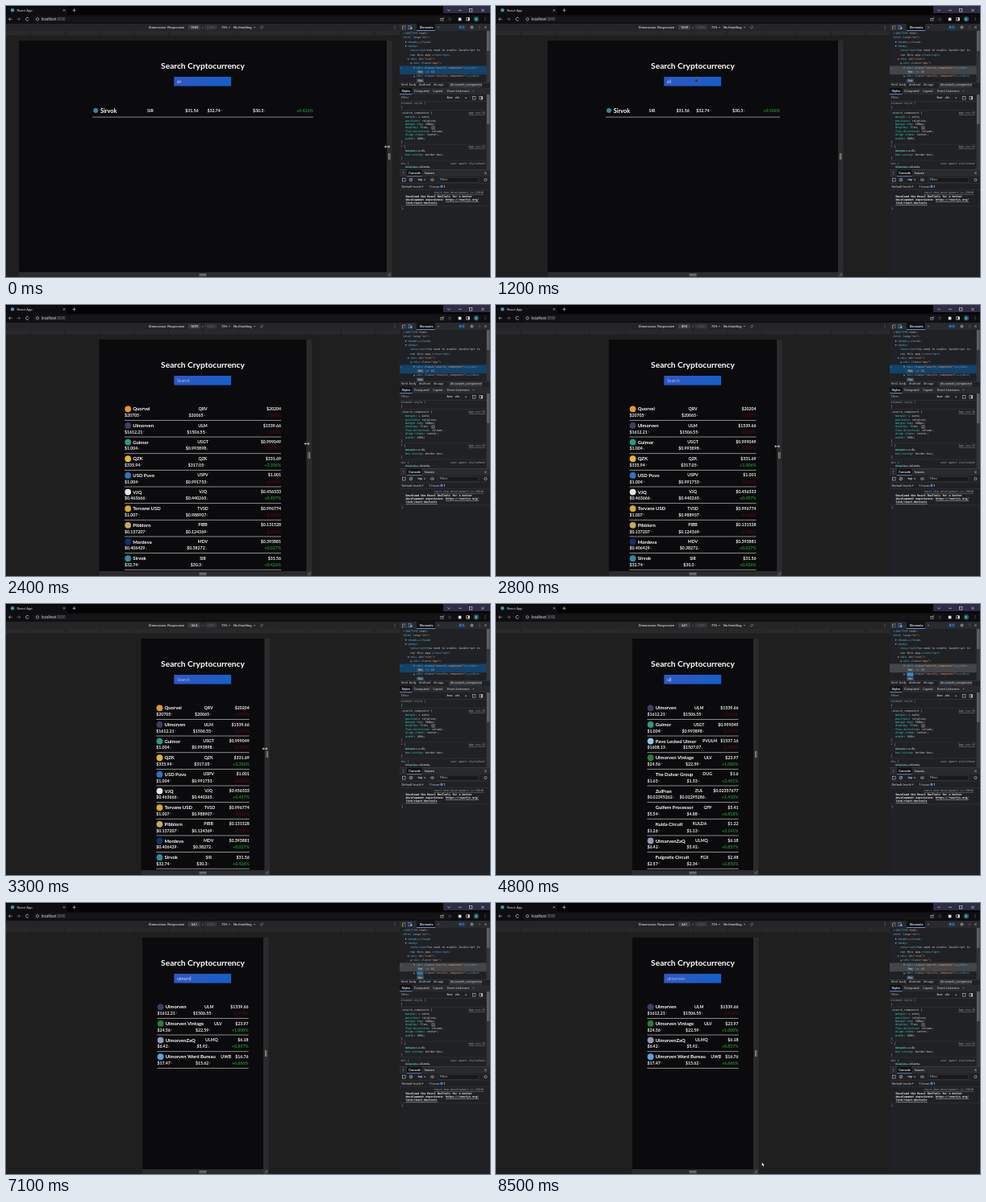
Write an HTML page with a canvas that moves like this. It is 600 px wide and 337 px high and loops after 8.6 s.

```html
<!DOCTYPE html>
<html lang="en">
<head>
<meta charset="utf-8">
<title>Search Cryptocurrency</title>
<style>
html, body { margin: 0; width: 100%; height: 100%; overflow: hidden; background: #1f1f20; }
canvas { display: block; width: 600px; height: 337px; }
</style>
</head>
<body>
<canvas id="stage"></canvas>
<script>
const LOOP = 8600, STEP = 100, CENTER = 244, PAGE_TOP = 43, PAGE_BOTTOM = 331;
const SANS = 'Lato, "Open Sans", sans-serif';
const UI = 'Roboto, sans-serif';
const MONO = '"DejaVu Sans Mono", monospace';
const canvas = document.getElementById('stage');
const ctx = canvas.getContext('2d');
const ratio = window.devicePixelRatio || 1;
canvas.width = 600 * ratio;
canvas.height = 337 * ratio;

// name | symbol | price | high | low | change | icon colour
const coins = `
Quorvel|QRV|20204|20705|20065|-1.093|#e8962e
Ulmorven|ULM|1539.66|1612.21|1506.55|-2.018|#3c3f62
Gulmor|USGT|0.999049|1.004|0.993898|-0.109|#2a9b7c
QZK|QZK|331.69|335.94|317.05|+3.306|#e9b233
USD Puvo|USPV|1.001|1.004|0.991753|-0.020|#2c74c6
VJQ|VJQ|0.456333|0.463666|0.440265|+0.457|#e4e4e4
Torvane USD|TVSD|0.996774|1.007|0.988907|-0.160|#d9a92c
Pibblorn|PIBB|0.131528|0.137207|0.124369|-2.355|#c9a860
Mordeva|MDV|0.393881|0.406429|0.38272|+0.027|#14306a
Sirvok|SIR|31.56|32.74|30.3|+0.426|#2f8aa0
Tarnobix|TNB|0.879112|0.91204|0.86107|-1.420|#7a4fd0
Hexlume|HXL|6.52|6.71|6.33|+0.912|#d0488a
Pavo Locked Ulmor|PVULM|1537.16|1608.13|1507.07|-2.104|#8cc8e8
Ulmorven Vintage|ULV|23.97|24.56|22.59|+1.000|#2b7a3c
The Dulvar Group|DUG|1.6|1.65|1.53|+2.401|
ZulPran|ZUL|0.02357677|0.02395262|0.02295286|+1.410|
Gulfern Processor|GFP|5.41|5.54|4.88|+6.818|
Kulda Circuit|KULDA|1.22|1.26|1.13|+2.141|
UlmorvenZaQ|ULMQ|6.18|6.42|5.92|+0.857|#9298b8
Fulgratix Circuit|FGX|2.48|2.57|2.34|+2.850|
Ulmorven Word Bureau|UWB|16.76|17.47|15.62|+6.666|#5aa0e6
`.trim().split('\n').map(line => {
  const [name, symbol, price, high, low, change, color] = line.split('|');
  return { name, symbol, price, high, low, change, color };
});

const widths = [[0, 456], [700, 360], [2000, 360], [2400, 257], [2900, 196], [3300, 153], [3500, 150]];
const queries = [
  [0, 'sir'], [1200, 'si'], [1300, 's'], [1400, ''], [4800, 'ul'], [5000, 'ulm'], [5100, 'ulmo'],
  [5300, 'ulmor'], [5500, 'ulmorz'], [5700, 'ulmorze'], [5900, 'ulmorzen'], [6400, 'ulmorz'],
  [6600, 'ulmor'], [6900, 'ulmorv'], [7200, 'ulmorve'], [7500, 'ulmorven']
];
const listChanges = [1300, 1400, 4800, 5000, 5300, 5500, 6600, 6900];

function track(keys, t) {
  const i = keys.findIndex(k => k[0] > t);
  if (i < 0) return keys[keys.length - 1][1];
  if (i === 0) return keys[0][1];
  const [t0, a] = keys[i - 1], [t1, b] = keys[i];
  return a + (b - a) * (t - t0) / (t1 - t0);
}
const held = (keys, t) => keys.filter(k => k[0] <= t).pop()[1];

function rect(x, y, w, h, color) {
  ctx.fillStyle = color;
  ctx.fillRect(x, y, w, h);
}
function round(x, y, w, h, r, color) {
  ctx.fillStyle = color;
  ctx.beginPath();
  ctx.roundRect(x, y, w, h, r);
  ctx.fill();
}
function disc(x, y, r, color) {
  ctx.fillStyle = color;
  ctx.beginPath();
  ctx.arc(x, y, r, 0, Math.PI * 2);
  ctx.fill();
}
function line(points, color, width = 0.6) {
  ctx.strokeStyle = color;
  ctx.lineWidth = width;
  ctx.beginPath();
  points.forEach(([x, y], i) => i ? ctx.lineTo(x, y) : ctx.moveTo(x, y));
  ctx.stroke();
}
function ring(x, y, r, color, from = 0, to = Math.PI * 2) {
  ctx.strokeStyle = color;
  ctx.lineWidth = 0.7;
  ctx.beginPath();
  ctx.arc(x, y, r, from, to);
  ctx.stroke();
}
function frame(x, y, w, h, color) {
  ctx.strokeStyle = color;
  ctx.lineWidth = 0.6;
  ctx.strokeRect(x, y, w, h);
}
function text(s, x, y, size, color, font = UI, align = 'left', weight = 400) {
  ctx.font = `${weight} ${size}px ${font}`;
  ctx.textAlign = align;
  ctx.textBaseline = 'middle';
  ctx.fillStyle = color;
  ctx.fillText(s, x, y);
  return ctx.measureText(s).width;
}
const ui = (s, x, y, color = '#d2d4d7') => text(s, x, y, 4, color, UI, 'left', 500);
const mono = (s, x, y, color = '#c4c7ca', weight = 400) => text(s, x, y, 3.43, color, MONO, 'left', weight);
function triangle(x, y, color = '#9aa0a6', down = true) {
  ctx.fillStyle = color;
  ctx.beginPath();
  if (down) { ctx.moveTo(x - 1.2, y - 0.7); ctx.lineTo(x + 1.2, y - 0.7); ctx.lineTo(x, y + 1); }
  else { ctx.moveTo(x - 0.7, y - 1.2); ctx.lineTo(x - 0.7, y + 1.2); ctx.lineTo(x + 1, y); }
  ctx.fill();
}
function cross(x, y, r, color) {
  line([[x - r, y - r], [x + r, y + r]], color);
  line([[x + r, y - r], [x - r, y + r]], color);
}
function dots(x, y, color = '#b8bbbe') {
  for (const d of [-1.6, 0, 1.6]) disc(x, y + d, 0.45, color);
}
function scrollbar(y, height, thumb) {
  rect(595.5, y, 4.5, height, '#343538');
  rect(596, y, 3.5, thumb, '#5c5e61');
}

function drawBrowser() {
  rect(0, 0, 600, 11, '#040405');
  round(1, 1, 75, 11, [3, 3, 0, 0], '#0e0e10');
  disc(8, 5.3, 2.2, '#3d95ab');
  text('React App', 13.5, 5.5, 4.2, '#d8dadd');
  cross(72, 5.3, 1.2, '#c8cacc');
  line([[82.5, 5.3], [86.5, 5.3]], '#e4e5e7');
  line([[84.5, 3.3], [84.5, 7.3]], '#e4e5e7');
  rect(542, 0, 58, 9, '#2e2c47');
  line([[547.2, 4.5], [549, 6.2], [550.8, 4.5]], '#d8dadd');
  line([[561, 5.3], [565, 5.3]], '#d8dadd');
  frame(574.5, 3.6, 3.4, 3.4, '#d8dadd');
  cross(591, 5.3, 1.7, '#d8dadd');

  rect(0, 11, 600, 11, '#0e0e10');
  for (const [x, dir, c] of [[5.5, -1, '#d0d2d5'], [15.5, 1, '#85888c']]) {
    line([[x - 2, 16.3], [x + 2, 16.3]], c);
    line([[x + dir * 0.3, 14.4], [x + dir * 2, 16.3], [x + dir * 0.3, 18.2]], c);
  }
  ring(26.5, 16.3, 2, '#d0d2d5', 0.5, 5.8);
  round(33, 12.4, 521, 8, 4, '#151517');
  ring(39, 16.3, 1.6, '#b8bbbe');
  const w = text('localhost', 44, 16.5, 4.5, '#e0e2e4');
  text(':3000', 44 + w, 16.5, 4.5, '#85888c');
  frame(538.8, 15.3, 3.2, 2.8, '#b8bbbe');
  line([[540.5, 16.5], [543, 13.8]], '#b8bbbe');
  text('☆', 550, 16.3, 5, '#b8bbbe', '"DejaVu Sans", sans-serif', 'center');
  rect(560.8, 14.7, 3.6, 3.6, '#e4e5e7');
  frame(570.8, 14.7, 3.8, 3.4, '#e4e5e7');
  rect(572.7, 14.7, 1.9, 3.4, '#e4e5e7');
  disc(583, 16.3, 3.2, '#176068');
  text('E', 583, 16.5, 4, '#fff', UI, 'center');
  dots(594, 16.3);
}

function drawDeviceBar(width) {
  rect(0, 22, 488, 9, '#252527');
  ui('Dimensions: Responsive', 177, 26.6);
  triangle(220, 26.6);
  round(226, 23.6, 15, 6, 0.8, '#3b3c3f');
  text(String(Math.round(width * 4.275)), 233.5, 26.7, 4, '#e0e2e4', UI, 'center', 500);
  ui('×', 242.7, 26.6, '#8b8e92');
  round(246.5, 23.6, 15, 6, 0.8, '#333437');
  text('1230', 254, 26.7, 4, '#606367', UI, 'center');
  ui('73%', 267, 26.6);
  triangle(277, 26.6);
  ui('No throttling', 282, 26.6);
  triangle(308, 26.6);
  ctx.save();
  ctx.translate(317, 26.6);
  ctx.rotate(Math.PI / 4);
  frame(-1, -1.6, 2, 3.2, '#8b8e92');
  ctx.restore();
  dots(482, 26.6);
  rect(0, 31, 488, 306, '#1f1f20');
  rect(0, 31, 488, 5.5, '#29292b');
  for (let x = CENTER - 5 * 42.75; x < 488; x += 42.75) rect(x, 31, 0.6, 5.5, '#1c1c1d');
}

const changeColor = coin => coin.change[0] === '+' ? '#22902c' : '#520916';
const value = (s, x, y, align, color = '#f2f2f2') => text(s, x, y, 5.2, color, SANS, align, 700);
function drawPrice(amount, arrow, x, y, centered = false) {
  ctx.font = `700 5.2px ${SANS}`;
  const w = ctx.measureText('$' + amount).width;
  const left = centered ? x - w / 2 - 1 : x;
  value('$' + amount, left, y, 'left');
  text(arrow, left + w + 0.2, y, 3, '#b0b0b0', '"DejaVu Sans", sans-serif');
}

function drawWideRow(coin, x, w, y) {
  if (coin.color) disc(x + 4, y, 3, coin.color);
  text(coin.name, x + 9.8, y + 0.3, 7.3, '#fff', SANS, 'left', 700);
  value(coin.symbol, x + w * 0.248, y + 0.3, 'left');
  value('$' + coin.price, x + w * 0.48, y + 0.3, 'right');
  drawPrice(coin.high, '↑', x + w * 0.52, y + 0.3);
  drawPrice(coin.low, '↓', x + w * 0.727, y + 0.3);
  value(coin.change + '%', x + w, y + 0.3, 'right', changeColor(coin));
  rect(x, y + 7.7, w, 0.8, '#a9a9a9');
}

function drawNarrowRow(coin, x, w, y) {
  if (coin.color) disc(x + 4.2, y, 3.9, coin.color);
  const nameWidth = text(coin.name, x + 10.3, y + 0.3, 5.9, '#fff', SANS, 'left', 700);
  const first = Math.max(w / 3, 48, Math.min(nameWidth + 15.3, 76));
  value(coin.symbol, x + first + (w - first) / 4, y, 'center');
  value('$' + coin.price, x + w, y, 'right');
  drawPrice(coin.high, '↑', x, y + 8.3);
  drawPrice(coin.low, '↓', x + 57.5 + (w - 115) * 0.405, y + 8.3, true);
  value(coin.change + '%', x + w, y + 8.3, 'right', changeColor(coin));
  rect(x, y + 13.7, w, 0.8, '#a9a9a9');
}

function drawInput(t, query, focused) {
  const fill = ctx.createLinearGradient(208.5, 88, 279.5, 99);
  fill.addColorStop(0, '#2f57c4');
  fill.addColorStop(1, '#145fcb');
  rect(208.3, 88, 70.8, 11.6, fill);
  const color = query && t < 7800 ? '#d5e1fa' : '#a4bdf0';
  const w = text(query || 'Search', 212, 94, 5.3, color, SANS);
  const blink = (t >= 3800 && t < 4000) || (t >= 4200 && t < 4500);
  const typing = t >= 4800 && t < 6100 || t >= 6400 && t < 7800;
  if (focused && (blink || typing || t < 2000)) rect(212.4 + (query ? w : 0), 91.3, 0.5, 5.2, '#e8eefc');
}

function drawPage(t, width, focused) {
  const left = CENTER - width / 2, right = CENTER + width / 2;
  rect(left, PAGE_TOP, width, PAGE_BOTTOM - PAGE_TOP, '#0b0b0d');
  rect(right, PAGE_TOP, 6.5, PAGE_BOTTOM - PAGE_TOP, '#2b2b2d');
  rect(left, PAGE_BOTTOM, width, 6, '#2b2b2d');
  rect(right, PAGE_BOTTOM, 6.5, 6, '#343436');
  for (const d of [0, 1.6]) {
    rect(right + 2 + d, 183, 0.8, 8, '#a4a4a4');
    rect(CENTER - 4.5, 333.2 + d, 9, 0.8, '#a4a4a4');
  }
  line([[right + 1.5, 335.5], [right + 5, 332.2]], '#999');
  line([[right + 3.3, 335.7], [right + 5, 334]], '#999');

  text('Search Cryptocurrency', CENTER, 75, 10.2, '#fff', SANS, 'center', 700);
  const query = held(queries, t);
  drawInput(t, query, focused);

  const found = coins.filter(c => c.name.toLowerCase().includes(query) || c.symbol.toLowerCase().includes(query));
  if (!found.length) {
    text('No results', CENTER - 0.8, 129, 7.5, '#fff', SANS, 'center', 700);
    return;
  }
  ctx.save();
  ctx.beginPath();
  ctx.rect(left, PAGE_TOP, width, PAGE_BOTTOM - PAGE_TOP);
  ctx.clip();
  const wide = width > 285;
  const w = width * (wide ? 0.6 : 0.755);
  found.forEach((coin, i) => {
    if (wide) drawWideRow(coin, CENTER - w / 2, w, 130 + i * 15.5);
    else drawNarrowRow(coin, CENTER - w / 2, w, 129.3 + i * 20.65);
  });
  ctx.restore();
}

function markup(s, x, y) {
  for (const part of s.split(/("[^"]*"|\b(?:class|id|lang)(?==)|<[^\s>]*|>)/)) {
    const color = part[0] === '"' ? '#f29766' : /^[<>]/.test(part) ? '#5db0d7' :
      /^(class|id|lang)$/.test(part) ? '#9bbbdc' : '#c8cbcf';
    x += mono(part, x, y, color);
  }
}
function badge(x, y) {
  round(x, y - 2.2, 9, 4.4, 1.5, '#40505f');
  text('flex', x + 4.5, y, 3.3, '#d5dbe2', UI, 'center');
}

function drawElements(t, focused) {
  rect(488, 22, 112, 315, '#202124');
  rect(488, 22, 112, 9, '#292a2d');
  line([[496, 25], [491.5, 25], [491.5, 29], [493, 29]], '#b8bbbe');
  line([[493.5, 26.5], [496, 29]], '#b8bbbe');
  frame(499, 24.5, 3, 4.2, '#5f9ee8');
  rect(501.2, 26, 2.2, 3, '#5f9ee8');
  rect(509, 22, 23, 9, '#111214');
  ui('Elements', 513, 26.6, '#f0f1f3');
  rect(509, 30.2, 23, 0.8, '#7cacf8');
  ui('»', 535, 26.4);
  round(560.5, 24, 9, 5.2, 1, '#1d3e63');
  rect(562.3, 25.4, 2, 2, '#4a8fe8');
  ui('1', 565.8, 26.7, '#8fbcf5');
  ring(577.5, 26.5, 1.6, '#b8bbbe');
  ring(577.5, 26.5, 0.5, '#b8bbbe');
  dots(587, 26.5);
  cross(594.5, 26.5, 1.3, '#b8bbbe');

  rect(488, 74.4, 108, 10.8, focused ? '#434548' : '#12436b');
  scrollbar(31, 64, 25);
  mono('…', 489, 77, '#9aa0a6');
  const rows = [
    [492, '<!DOCTYPE html>'], [492, '<html lang="en">'], [498, '<head>…</head>', 0], [498, '<body>', 1],
    [501, '<noscript>You need to enable JavaScript to'], [501, 'run this app.</noscript>'],
    [501, '<div id="root">', 1], [504.5, '<div class="app">', 1],
    [508.5, '<div class="search_component">…</div>', 0], null, [508.5, '<div class="results_component">…</div>', 0]
  ];
  const change = listChanges.filter(c => c <= t).pop();
  const flash = change === undefined ? 0 : Math.max(0, 1 - (t - change) / 600);
  if (flash) rect(509.5, 85.3, 8, 4.8, `rgba(48, 132, 190, ${flash})`);
  rows.forEach((row, i) => {
    if (!row) return;
    const y = 34 + i * 5.35;
    markup(row[1], row[0], y);
    if (row.length > 2) triangle(row[0] - 2.3, y, '#9aa0a6', !!row[2]);
  });
  badge(509, 82.2);
  mono('== $0', 520.5, 82.2, '#a9aeb3');
  badge(509, 92.8);

  rect(488, 95, 112, 7, '#202124');
  rect(488, 95, 112, 0.5, '#3c3d40');
  rect(549, 95.5, 41, 6, '#33363a');
  [[490, 'html'], [500, 'body'], [512, 'div#root'], [530, 'div.app'], [551, 'div.search_component']]
    .forEach(([x, s]) => text(s, x, 98.2, 3.9, '#c4c7ca'));
}

function drawStyles() {
  rect(488, 102, 112, 8, '#292a2d');
  rect(488, 102, 15.5, 8, '#111214');
  [[490.5, 'Styles'], [506, 'Computed'], [529.5, 'Layout'], [547, 'Event Listeners'], [578.5, '»']]
    .forEach(([x, s], i) => ui(s, x, 106, i ? '#b0b3b6' : '#f0f1f3'));
  rect(488, 109.3, 15.5, 0.8, '#7cacf8');
  scrollbar(110, 93, 37);
  rect(488, 118, 107.5, 0.5, '#3c3d40');
  ui('Filter', 490, 114.3, '#8b8e92');
  ui(':hov', 546, 114.3);
  ui('.cls', 556, 114.3);
  ui('+', 569, 114.2);
  frame(578.5, 112.6, 3.5, 3.5, '#b8bbbe');
  frame(587, 112.6, 3.8, 3.5, '#b8bbbe');
  rect(589, 112.6, 1.8, 3.5, '#b8bbbe');

  const declaration = (name, setting, y, struck) => {
    const w = mono(name, 495, y, '#35d4c7');
    const total = w + mono(': ' + setting + ';', 495 + w, y, '#d8dadd');
    if (struck) line([[495, y], [495 + total, y]], '#b5b8bb', 0.4);
  };
  const link = (s, y, underline = true) => {
    const w = text(s, 594, y, 3.43, '#a5a8ab', MONO, 'right');
    if (underline) rect(594 - w, y + 1.8, w, 0.35, '#a5a8ab');
  };
  mono('element.style {', 489.5, 121.6, '#9aa0a6');
  mono('}', 489.5, 126.5);
  rect(488, 129.5, 107.5, 0.4, '#3c3d40');
  mono('.search_component {', 489.5, 133.3);
  link('App.css:35', 133.3);
  [['margin', '▸ auto'], ['position', 'relative'], ['margin-top', '100px'], ['display', 'flex'],
    ['flex-direction', 'column'], ['align-items', 'center'], ['width', '100%']]
    .forEach(([name, setting], i) => declaration(name, setting, 138.4 + i * 4.4));
  frame(528, 150, 3, 3, '#b8bbbe');
  mono('}', 489.5, 169);
  rect(488, 171.8, 107.5, 0.4, '#3c3d40');
  mono('* {', 489.5, 175.4);
  link('App.css:22', 175.4);
  declaration('margin', '▸ 0', 180.3, true);
  declaration('box-sizing', 'border-box', 184.7);
  mono('}', 489.5, 189);
  rect(488, 191.8, 107.5, 0.4, '#3c3d40');
  mono('div {', 489.5, 195.7, '#a5a8ab');
  link('user agent stylesheet', 195.7, false);
  declaration('display', 'block', 200.5, true);
}

function drawConsole() {
  rect(488, 203, 112, 134, '#202124');
  rect(488, 203, 112, 9, '#292a2d');
  rect(488, 203, 112, 0.5, '#46474a');
  dots(492.5, 207.8);
  rect(497, 203.5, 18.5, 8.5, '#111214');
  ui('Console', 499.3, 207.9, '#f0f1f3');
  rect(497, 211.4, 18.5, 0.7, '#7cacf8');
  ui('Issues', 519, 207.9);
  cross(594.5, 207.8, 1.3, '#b8bbbe');
  frame(491.3, 214.2, 3.8, 3.8, '#b8bbbe');
  ring(502, 216.1, 1.8, '#b8bbbe');
  line([[500.8, 217.3], [503.2, 214.9]], '#b8bbbe');
  ui('top', 510.5, 216.2);
  triangle(519, 216.2);
  ctx.strokeStyle = '#b8bbbe';
  ctx.beginPath();
  ctx.ellipse(528.5, 216.1, 2.2, 1.4, 0, 0, Math.PI * 2);
  ctx.stroke();
  disc(528.5, 216.1, 0.6, '#b8bbbe');
  round(536, 213.2, 50, 6, 0.8, '#18191b');
  frame(536, 213.2, 50, 6, '#3c3d40');
  ui('Filter', 538, 216.3, '#9aa0a6');
  ring(594.5, 216.1, 1.6, '#b8bbbe');
  rect(488, 220, 112, 0.4, '#3c3d40');
  ui('Default levels', 490.5, 224.5, '#a9acb0');
  triangle(516.5, 224.5);
  ui('1 Issue:', 524, 224.5, '#a9acb0');
  rect(538.5, 222.9, 3, 3, '#3d84e0');
  ui('1', 542.6, 224.5);
  rect(488, 228.5, 112, 0.4, '#3c3d40');

  const source = text('react-dom.development.js:29840', 592, 232.3, 3.43, '#9a9da1', MONO, 'right');
  rect(592 - source, 234, source, 0.35, '#9a9da1');
  const strong = (s, x, y, underline) => {
    const w = mono(s, x, y, '#eceef0', 700);
    if (underline) rect(x, y + 1.8, w, 0.4, '#eceef0');
    return w;
  };
  strong('Download the React DevTools for a better', 495.5, 236.9);
  const w = strong('development experience: ', 495.5, 241.2);
  strong('https://reactjs.org/', 495.5 + w, 241.2, true);
  strong('link/react-devtools', 495.5, 245.5, true);
  rect(488, 248.7, 112, 0.4, '#3c3d40');
  line([[490.5, 250.5], [492, 252], [490.5, 253.5]], '#5f9ee8');
}

function drawArrow(x, y) {
  ctx.beginPath();
  [[0, 0], [0, 5], [1.2, 4], [2, 5.9], [2.9, 5.5], [2.1, 3.7], [3.6, 3.6]]
    .forEach(([dx, dy]) => ctx.lineTo(x + dx, y + dy));
  ctx.closePath();
  ctx.fillStyle = '#fff';
  ctx.strokeStyle = '#000';
  ctx.lineWidth = 0.4;
  ctx.fill();
  ctx.stroke();
}
function drawResizer(x, y) {
  line([[x - 2.8, y], [x + 2.8, y]], '#fff', 0.7);
  for (const d of [-1, 1]) line([[x + d * 1.6, y - 1.3], [x + d * 3, y], [x + d * 1.6, y + 1.3]], '#fff', 0.7);
}
function drawPointer(t, width) {
  const right = CENTER + width / 2;
  const dragging = t <= 700 || (t >= 2000 && t <= 3500);
  if (dragging) {
    drawResizer(right + 0.5, track([[0, 175], [700, 178], [2000, 171], [2400, 172.5], [3300, 180]], t));
    return;
  }
  if (t >= 4500 && t < 8000) return;
  const x = track([[700, 424], [900, 272], [1000, 248.5], [1500, 248.5], [2000, 424],
    [3500, 320], [3800, 220], [4000, 217], [8000, 229], [8100, 236], [8500, 329.5]], t);
  const y = track([[700, 178], [900, 92.5], [1500, 93], [2000, 171],
    [3500, 180], [3800, 95], [8000, 48], [8100, 70], [8400, 290], [8500, 322.3]], t);
  if (x > right) {
    drawArrow(x, y);
    return;
  }
  disc(x, y, 2.8, 'rgba(40, 46, 58, 0.65)');
  ring(x, y, 2.5, 'rgba(150, 160, 175, 0.55)');
}

function draw(now) {
  const t = Math.floor((now % LOOP) / STEP) * STEP;
  const width = track(widths, t);
  const focused = (t >= 1200 && t < 2100) || t >= 3800;
  ctx.setTransform(ratio, 0, 0, ratio, 0, 0);
  drawBrowser();
  drawDeviceBar(width);
  drawPage(t, width, focused);
  drawElements(t, focused);
  drawStyles();
  drawConsole();
  drawPointer(t, width);
}

let start;
function tick(now) {
  start ??= now;
  draw(now - start);
  requestAnimationFrame(tick);
}
requestAnimationFrame(tick);
</script>
</body>
</html>
```
